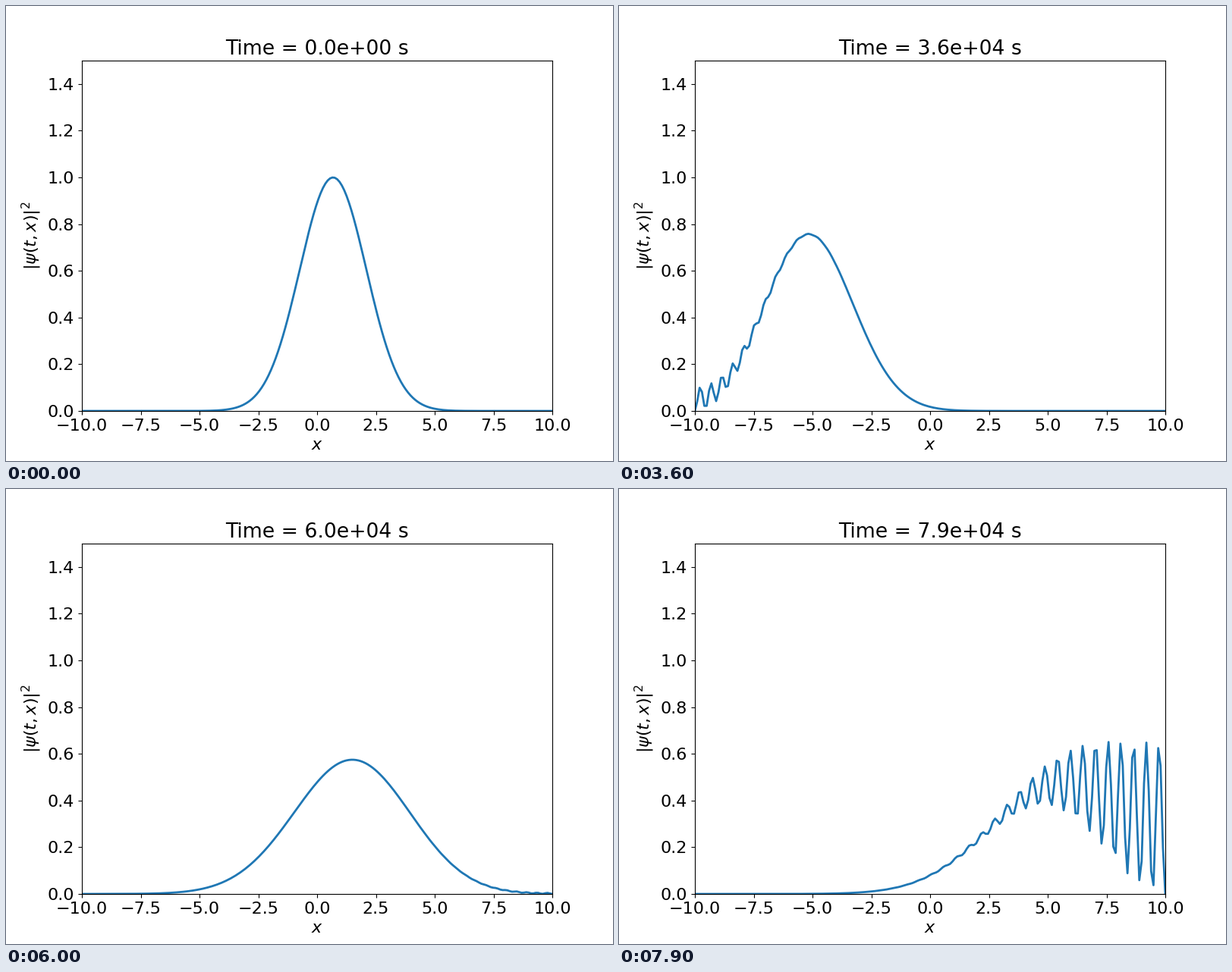
A matplotlib script that plays this animation: 800 by 600 pixels, repeating every 8000 ms.

```python
import numpy as np
import matplotlib.pyplot as plt
from matplotlib.animation import FuncAnimation

plt.rcParams["font.family"] = "DejaVu Sans"
plt.rcParams["font.size"] = 16

# Electron wave packet between two hard walls
HBAR = 1.054571817e-34
MASS = 9.1093837e-31
HALF = 10.0
POINTS = 200
SIGMA = 2.0
K0 = 2 * np.pi
STEP = 1000.0  # seconds of simulated time per frame
FRAMES = 80

x = np.linspace(-HALF, HALF, POINTS)
dx = x[1] - x[0]

# Sine modes of the finite-difference Laplacian, zero at both walls
n = np.arange(1, POINTS - 1)
modes = np.sqrt(2 / (POINTS - 1)) * np.sin(np.pi * np.outer(n, n) / (POINTS - 1))
omega = HBAR / MASS * (1 - np.cos(np.pi * n / (POINTS - 1))) / dx**2

psi0 = np.exp(-x**2 / (2 * SIGMA**2) + 1j * K0 * x)
coeffs = modes @ psi0[1:-1]


def density(t):
    psi = np.zeros(POINTS, dtype=complex)
    psi[1:-1] = modes @ (coeffs * np.exp(-1j * omega * t))
    return np.abs(psi) ** 2


fig, ax = plt.subplots(figsize=(8, 6), dpi=100)
line, = ax.plot(x, density(STEP), lw=2)
ax.set_xlim(-HALF, HALF)
ax.set_ylim(0, 1.5)
ax.set_xlabel("$x$")
ax.set_ylabel(r"$|\psi(t,x)|^2$")
title = ax.set_title("")


def update(i):
    # The label shows the time at the start of each step
    line.set_ydata(density((i + 1) * STEP))
    title.set_text(f"Time = {i * STEP:.1e} s")
    return line, title


anim = FuncAnimation(fig, update, frames=FRAMES, interval=100, repeat=True)
plt.show()
```
